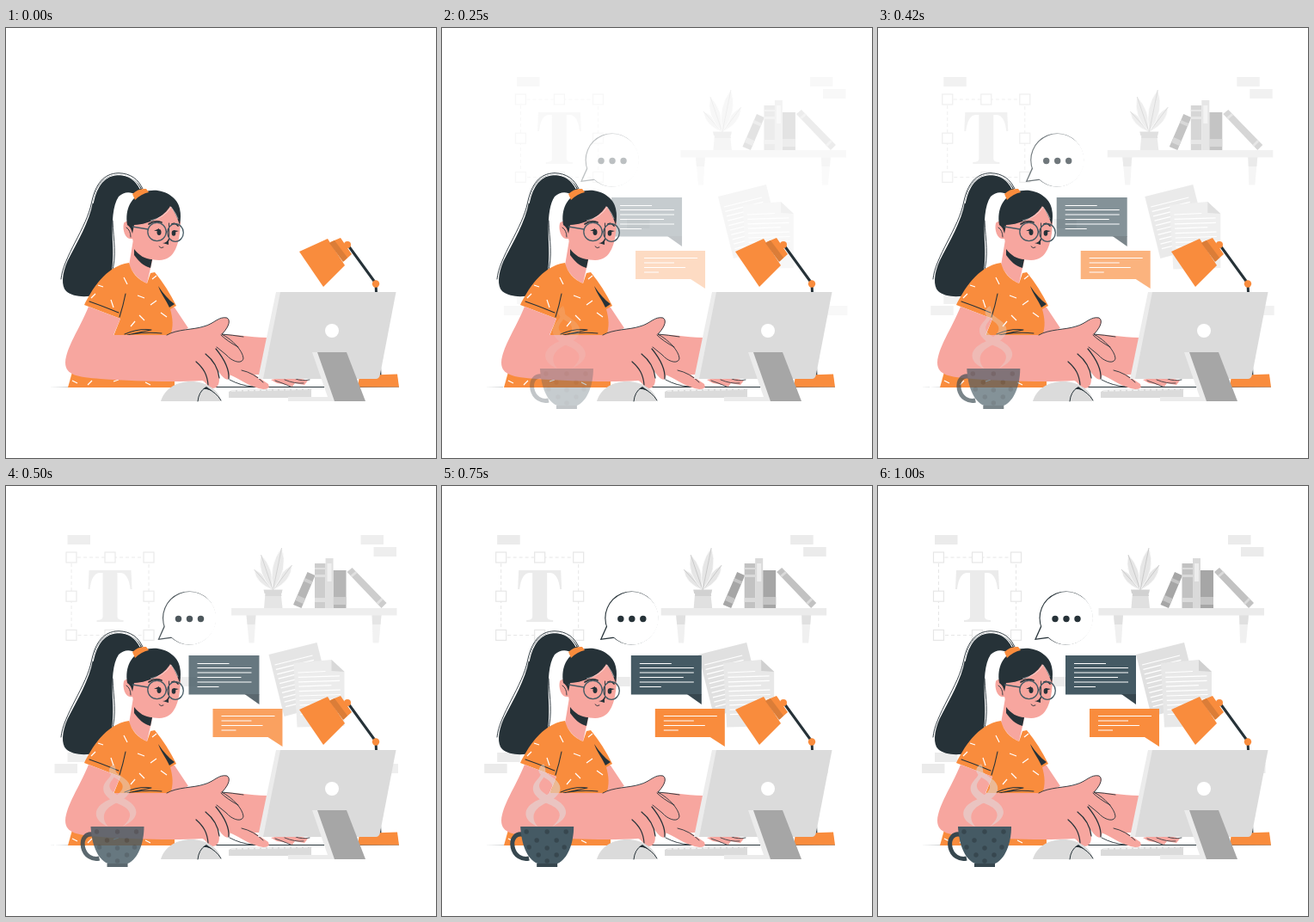
Recreate the animation shown at these times as an HTML page. Size 500x500 px, loop 1040 ms.

```html
<!DOCTYPE html>
<html lang="en">
<head>
<meta charset="utf-8">
<title>Designer at her desk</title>
<style>
html, body { margin: 0; height: 100%; overflow: hidden; background: #fff; }
svg { display: block; width: 100vw; height: 100vh; }
.dark { fill: #263238; }
.skin { fill: #f7a69f; }
.orange { fill: #f98c3d; }
.pale { fill: #ebebeb; }
.ink { fill: none; stroke: #263238; stroke-linecap: round; stroke-linejoin: round; }
.white { fill: none; stroke: #fff; stroke-width: 1.2; }
</style>
</head>
<body>
<svg viewBox="0 0 500 500">
  <!-- wall, shelf and papers -->
  <g class="fromRight">
    <g id="bricks" class="pale"></g>
    <rect x="70.5" y="83" width="90" height="90.5" fill="none" stroke="#e6e6e6" stroke-dasharray="4 3"/>
    <g id="handles" fill="#fff" stroke="#e6e6e6" stroke-width="1.2"></g>
    <path class="pale" d="M91 98H140L141 120H139Q137 102 128 101H124V152Q124 156 131 156V158H100V156Q107 156 107 152V101H103Q94 102 92 120H90Z"/>
    <path fill="#f0f0f0" d="M274 150H285L283 182.500H277ZM420 150H431L428 182.500H421Z"/>
    <path fill="#e0e0e0" d="M274 150H285L284 161H275ZM420 150H431L430 161H420.500Z"/>
    <path class="pale" d="M256.500 142H449V150.500H256.500Z"/>
    <g id="leaves" fill="#e6e6e6" stroke="#fff" stroke-width=".7"></g>
    <path fill="#e0e0e0" d="M296 124H314L316 142H294.500Z"/>
    <path fill="#d1d1d1" d="M294 120.500H316L315 125H295ZM296 125H314.500L315 128H296Z"/>
    <path fill="#a6a6a6" d="M345 100L354 104L338 142L328.500 138ZM375 98H390V142H375Z"/>
    <path fill="#c4c4c4" d="M342 107L351 111L349.500 114.500L340.500 110.500ZM333.500 127L342.500 131L340 137L331 133ZM375 129H390V138H375Z"/>
    <path fill="#c2c2c2" d="M353.500 90H366V142H353.500ZM391 100L397 95L437 136L431 142Z"/>
    <path fill="#dadada" d="M366 84H375V142H366ZM353.500 95H366V97H353.500ZM353.500 103H366V106H353.500ZM353.500 130H366V135H353.500ZM395 104L401 99L403 101L397 106ZM425 136L431 130L433 132L427 138Z"/>
    <path fill="#ededed" d="M368 90H373V111H368Z"/>
    <path fill="#e0e0e0" d="M300 196L356 182L374 253L318 268Z"/>
    <path id="backText" class="white"/>
    <path fill="#e8e8e8" d="M329 206L373 202L388 216V279L333 280.500Z"/>
    <path fill="#d0d0d0" d="M373 202L388 216L373 215Z"/>
    <path id="frontText" class="white"/>
  </g>

  <!-- chat bubbles -->
  <g class="fromLeft">
    <path class="dark" d="M189.500 162L182 179L201 176.500Z"/>
    <circle class="dark" cx="218.500" cy="153.500" r="31"/>
    <path fill="#fff" d="M191 162L184 177.500L202 175Z"/>
    <circle cx="219.300" cy="153.800" r="30.700" fill="#fff"/>
    <g class="dark"><circle cx="206" cy="154.500" r="3.700"/><circle cx="219" cy="154.500" r="3.700"/><circle cx="232" cy="154.500" r="3.700"/></g>
    <path fill="#455a64" d="M218 197H300V242.500H218Z"/>
    <path fill="#37474f" d="M283 242H300V254Z"/>
    <path class="orange" d="M246 259H327V303L310 292H246Z"/>
    <path id="chat" class="white"/>
  </g>

  <path class="dark" d="M50 417.500L150 417.100H380L457 417.300V417.700L380 417.900H150Z"/>

  <!-- ponytail -->
  <path class="dark" d="M159 189C153 177 143 170.500 130 170.500C113 171 105 183 101 202C97 226 83 248 71.500 271C65 286 64 300 70 306C80 315 106 314 115 304C124 294 125 270 124 250C123 225 124 206 131 196C137 190 145 190 151 194Z"/>
  <path class="ink" stroke-width=".9" d="M64 292C66 267 94 232 99.500 203C104 182 113 169 131 168.700C145 169 154 176 159 187M124 224C125 248 129 264 123 285"/>
  <path class="white" stroke-width=".8" d="M101 204C105 184 114 171 131 170.500C144 171 152 179 156 187"/>

  <!-- far arm and neck -->
  <path class="skin" d="M190 325L196 325L212 349L190 358ZM240 356C260 355 282 360 303 360V403H289L305 414Q308 420 299 420C285 418 273 409 262 404L246 398Z"/>
  <path class="skin" d="M149 240L143 276Q151 292 164 297L171 266Z"/>
  <path class="dark" d="M149 257C154 264 162 269 170 269L168 279C160 277 154 271 149 264Z"/>

  <!-- shirt -->
  <path class="orange" d="M72 418L77 400L196 410V418Z"/>
  <path class="orange" d="M143 273C146 285 154 293 164 297L168 285L173 284C183 296 191 309 198 323L191 327C194 338 195 347 191 358H125L133 338L91 322C99 306 115 277 143 273Z"/>
  <path class="dark" d="M177 300C183 309 189 316 196 321L190 325C186 316 180 309 177 300Z"/>
  <path class="white" stroke-width="1" d="M137 290L141 298M153 311L161 314M122 316L125 325M107 299L113 301M170 292L175 288M168 322L175 317M155 334L161 340M180 331L187 336M145 347L150 341M99 314L104 309M77 410L83 413M95 415L100 410M125 411L131 409M162 412L168 415"/>
  <path class="ink" stroke-width="1.100" d="M97 318C109 322 121 327 131 331M139 309Q136 324 132 336M138 356Q155 349 169 351Q155 354 141 357M146 356Q164 353 181 355"/>

  <!-- near arm and hand -->
  <path class="skin" d="M96 324L133 338L125 357H187C197 351 214 350 228 348C240 345 248 335 257 337C263 340 258 350 251 356C259 360 275 373 276 384C275 392 264 388 255 380C261 390 263 401 259 408C255 411 250 403 245 397C250 407 249 419 240 419C234 417 232 411 228 410C198 412 152 411 110 408C84 406 69 404 69 389C70 371 85 351 96 324Z"/>
  <path class="ink" stroke-width=".9" d="M187 357C199 350 218 351 230 347C242 344 247 335 257 337C263 341 256 351 251 356C264 363 275 375 276 384C275 391 264 389 256 380L245 371M250 357Q257 364 270 371"/>
  <path class="ink" stroke-width="1.200" d="M221 388C230 396 234 403 235 415M232 379C242 387 247 397 248 407M244 373C253 384 260 396 259 408"/>
  <path class="ink" stroke-width=".9" d="M260 409Q273 416 287 417M274 398Q288 401 299 412M251 356Q263 357 276 359"/>
  <path class="skin" d="M308 409Q328 403 351 410L347 415L336 413L333 417L322 414L315 413Z"/>
  <path class="ink" stroke-width=".8" d="M313 410Q322 413 331 417M324 409Q336 414 346 413M337 408Q344 411 353 409"/>

  <!-- head -->
  <path class="skin" d="M149 226C149 208 185 201 193 208L203 226C202 250 197 270 178 270C161 270 150 257 147 245C139 247 135 235 137 227C140 223 146 226 149 230Z"/>
  <path class="dark" d="M141 229C138 210 146 196 160 191C179 184 199 195 202 210Q204 219 202 229Q197 214 191 207C184 219 168 228 149 229L147 239Q145 231 141 229Z"/>
  <path class="white" style="stroke-width:.5" d="M168 224Q185 220 192 208Q198 216 200 222"/>
  <path class="orange" d="M147 193Q154 186 163 187L166 191Q157 193 150 200Z"/>
  <path class="ink" stroke-width=".9" d="M140 232Q145 235 145 243M178 254Q180 257 183 255M189.500 227V247"/>
  <path class="ink" stroke-width="1.700" d="M166 228Q173 223 181 226M193 228Q197 226 200 230"/>
  <path class="dark" d="M189 245V252L182 250Q187 250 189 245Z"/>
  <g class="dark"><ellipse cx="178" cy="237.500" rx="2.500" ry="3.400"/><ellipse cx="195" cy="238.500" rx="2.300" ry="3.200"/><path d="M172 236L178 233V236ZM195 235L201 236L195 238Z"/></g>
  <g fill="none" stroke="#455a64" stroke-width="1.300"><circle cx="175.500" cy="237" r="10.700"/><ellipse cx="197" cy="238" rx="9.300" ry="10.300"/><path d="M147 231L165 234M186 237H188"/></g>

  <!-- lamp -->
  <path class="ink" stroke-width="3" d="M398 253L430 297L435 405"/>
  <path class="orange" d="M377 249L389 244L402 263L393 271Z"/>
  <path class="orange" d="M341 260L374 245L394 276L369 301Z"/>
  <path fill="#db7d38" d="M376 250L382 247L397 267L392 272Z"/>
  <g class="orange"><circle cx="397" cy="252" r="4"/><circle cx="430" cy="297.500" r="4.200"/><path d="M411 404L455 402.500L457 417.500H409Z"/></g>

  <!-- keyboard, mouse, computer -->
  <path fill="#dbdbdb" d="M259 423L263 421L355 419V430H259Z"/>
  <path fill="none" stroke="#f2f2f2" stroke-width="1.500" stroke-dasharray="5 2" d="M262 422L354 420"/>
  <path fill="#dbdbdb" d="M180 434C184 420 198 411 215 411C233 411 248 421 250 434Z"/>
  <path class="ink" stroke-width="1" d="M223 434Q224 423 232 418Q245 424 250 433"/>
  <path class="dark" d="M229 420L233 417L240 422L233 420Z"/>
  <path class="ink" stroke-width="1.200" d="M432.500 398L434.500 403"/>
  <path fill="#ececec" d="M314 307H320L302 408H293Z"/>
  <path fill="#dbdbdb" d="M319 307H453.500L435 403Q434 408 430 408H299Z"/>
  <circle cx="379" cy="352" r="8" fill="#fff"/>
  <path fill="#ebebeb" d="M356 377H364L384 434H328V429H374Z"/>
  <path fill="#a6a6a6" d="M362 377H396L418 434H382Z"/>

  <!-- mug -->
  <g class="fromRight">
    <g fill="#e0dedd" opacity=".55">
      <path d="M113 396C94 388 95 373 114 365C131 357 135 348 124 341C114 335 110 330 120 323C117 331 124 334 132 340C144 349 141 360 124 368C108 375 104 385 113 396Z"/>
      <path d="M130 396C143 385 141 376 126 370C108 362 103 352 112 342C118 336 118 331 120 323C124 332 122 337 117 343C111 351 118 357 131 363C150 372 152 386 130 396Z"/>
    </g>
    <path fill="none" stroke="#37474f" stroke-width="5" d="M98 406C88 402 82 410 84 420C86 430 95 435 103 433"/>
    <path fill="#455a64" d="M93 396H155C155 415 148 434 136 439H113C100 434 94 415 93 396Z"/>
    <path fill="#37474f" d="M112 439H136V443H112Z"/>
    <g id="dots" fill="#37474f"></g>
  </g>
</svg>
<script>
const $ = id => document.getElementById(id);
const fill = (id, items, draw) => { $(id).innerHTML = items.map(draw).join(''); };
const rules = (id, rows) => $(id).setAttribute('d', rows.map(([x, y, w, rise = 0]) => `M${x} ${y}l${w} ${-rise}`).join(''));

fill('bricks', [[66, 57], [407, 57], [422, 71], [66, 310], [51, 323], [424, 323], [194, 222]],
  ([x, y]) => `<rect x="${x}" y="${y}" width="26.500" height="11"/>`);
fill('handles', [[0, 0], [1, 0], [2, 0], [0, 1], [2, 1], [0, 2], [1, 2], [2, 2]],
  ([i, j]) => `<rect x="${64.5 + 45 * i}" y="${77 + 45.2 * j}" width="12" height="12"/>`);
fill('dots', [[100, 402], [124, 402], [146, 402], [112, 412], [135, 412], [103, 420], [124, 421], [144, 420], [114, 429], [135, 429], [124, 436]],
  ([x, y]) => `<circle cx="${x}" cy="${y}" r="2.700"/>`);

// Each leaf is a tip; all grow from the pot.
fill('leaves', [[283, 97], [327, 92], [291, 80], [315, 72]], ([x, y]) => {
  const bx = 305, by = 121, mx = bx + (x - bx) * .65, my = by + (y - by) * .55;
  const nx = (by - y) * .25, ny = (x - bx) * .25;
  return `<path d="M${bx} ${by}Q${mx - nx} ${my - ny} ${x} ${y}Q${mx + nx} ${my + ny} ${bx} ${by}Z"/>` +
    `<path stroke="#bdbdbd" d="M${bx} ${by}L${x} ${y}"/>`;
});

const rows = [...Array(10).keys()];
rules('backText', rows.map(i => [307 + i * 1.4, 208 + i * 5.4, i % 3 == 2 ? 34 : 44, i % 3 == 2 ? 8.5 : 11]));
rules('frontText', rows.map(i => [334 + i * .3, 217 + i * 5.4, i < 1 ? 32 : i % 4 == 3 ? 38 : 48, 1.5]));
rules('chat', [
  [228, 206.5, 37], [228, 211.5, 63], [228, 217, 63], [228, 222.5, 51], [228, 228, 63], [228, 233.5, 25],
  [256, 267.5, 62], [256, 273, 35], [256, 278.5, 48], [256, 284, 17]
]);

// cubic-bezier(.36, -.01, .5, 1.38)
const bez = (a, b, u) => 3 * (1 - u) ** 2 * u * a + 3 * (1 - u) * u * u * b + u ** 3;
function ease(x) {
  let lo = 0, hi = 1;
  for (let i = 0; i < 24; i++) {
    const mid = (lo + hi) / 2;
    if (bez(.36, .5, mid) < x) lo = mid; else hi = mid;
  }
  return bez(-.01, 1.38, hi);
}

function slide(name, dir, e) {
  for (const g of document.querySelectorAll('.' + name)) {
    g.setAttribute('transform', `translate(${dir * 30 * (1 - e)} 0)`);
    g.setAttribute('opacity', e < .01 ? 0 : Math.min(1, e));
  }
}

const start = performance.now();
function draw(now) {
  const time = Math.max(0, now - start) % 1040;
  const step = Math.floor((time + 5) * 24 / 1000);   // 24 steps a second
  const e = ease(Math.min(1, (step + .95) / 24));
  slide('fromRight', 1, e);
  slide('fromLeft', -1, e);
  requestAnimationFrame(draw);
}
draw(start);
</script>
</body>
</html>
```
